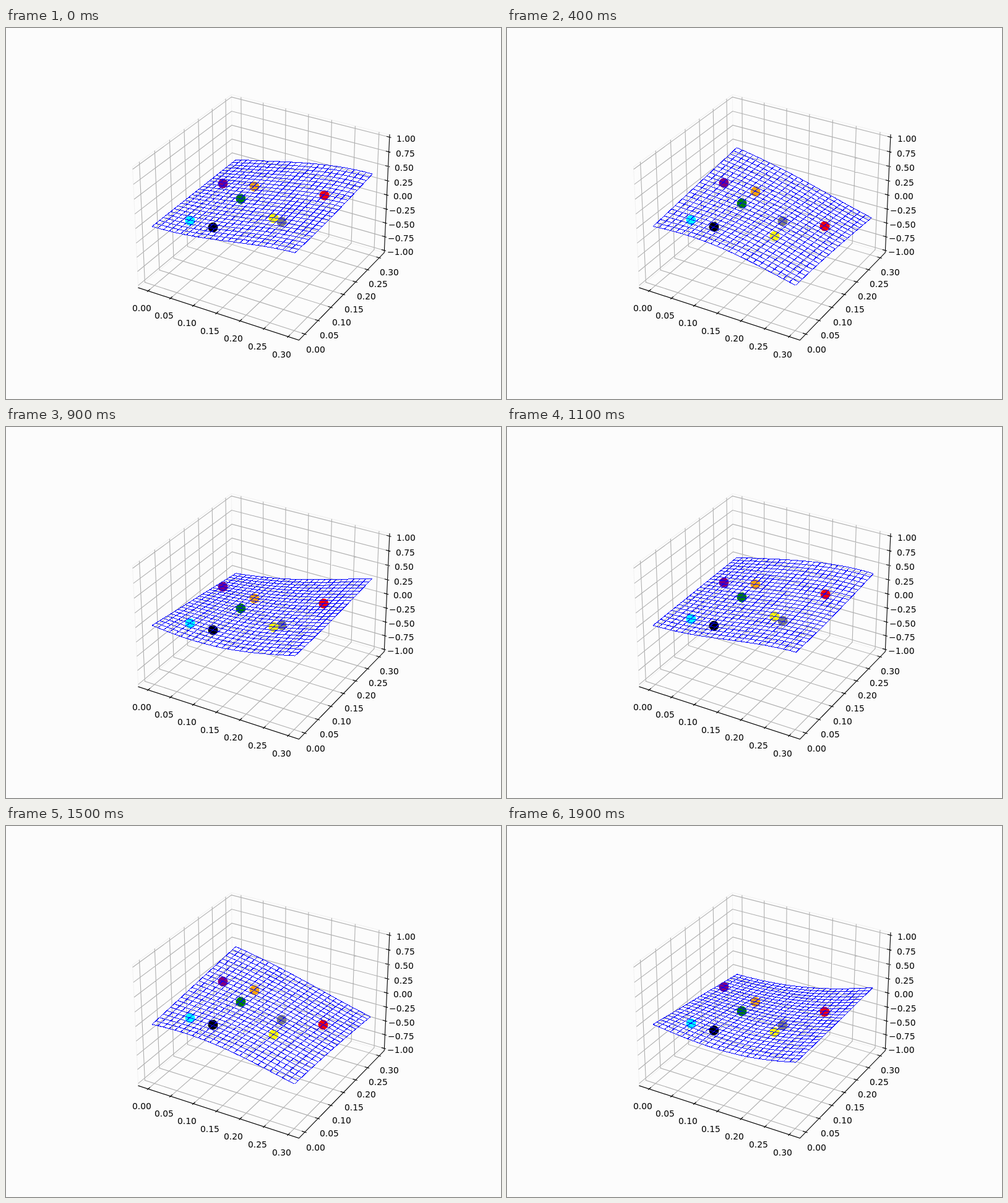
These frames come from a looping animation (800x600 px, 2 s). An HTML page:

```html
<!DOCTYPE html>
<html lang="en">
<head>
<meta charset="utf-8">
<title>Waving sheet</title>
<style>
  html, body { margin: 0; width: 100%; height: 100%; overflow: hidden; background: #fcfcfc; }
  svg { display: block; width: 800px; height: 600px; }
  path { fill: none; }
  text { font: 13.89px "DejaVu Sans", sans-serif; fill: #000; }
</style>
</head>
<body>
<svg id="stage" viewBox="0 0 800 600"></svg>
<script>
const svg = document.getElementById('stage');
const SIZE = 0.3, CELLS = 24;
const STEPS = 20, STEP_MS = 100;
const PHASE_STEP = 3.5 * Math.PI / (STEPS - 1);

// Half sizes of the plot box: the data limits, and the slightly larger panes.
const HX = 4 / 7, HZ = 3 / 7;
const PX = HX * 25 / 24, PZ = HZ * 25 / 24;
const DX = HX / 6, DZ = HZ / 6;

const boxX = v => ((v + SIZE * 0.05) / (SIZE * 1.1) - 0.5) * 2 * HX;
const boxZ = v => v * HZ;

// Camera at elevation 30, azimuth -60, distance 10.
const C = Math.sqrt(3) / 2;
const depth = (x, y, z) => C / 2 * x - 0.75 * y + z / 2;
function project(x, y, z) {
  const k = 2497.3 / (10 - depth(x, y, z));
  return [416.24 + k * (C * x + y / 2), 296.76 - k * (-x / 4 + C / 2 * y + C * z)];
}

const line = pts => 'M' + pts.map(p => project(...p).map(v => v.toFixed(2)).join(' ')).join('L');

function add(tag, attrs, text) {
  const el = document.createElementNS('http://www.w3.org/2000/svg', tag);
  for (const key in attrs) el.setAttribute(key, attrs[key]);
  if (text) el.textContent = text;
  return svg.appendChild(el);
}

function stroke(lines, color, cap = 'butt') {
  add('path', { d: lines.map(line).join(''), stroke: color, 'stroke-width': 1.11, 'stroke-linecap': cap });
}

// Labels hang centred below their anchor, snapped to whole pixels.
function label(value, x, y, z) {
  const [px, py] = project(x, y, z);
  const el = add('text', { y: Math.round(py + 10.9) }, value.toFixed(2).replace('-', '\u2212'));
  el.setAttribute('x', Math.round(px - el.getComputedTextLength() / 2));
}

function drawAxes() {
  const flat = Array.from({ length: 7 }, (_, i) => i * 0.05);
  const tall = Array.from({ length: 9 }, (_, i) => -1 + i * 0.25);
  const near = PX - 0.2 * DX, far = PX + 0.1 * DX;
  const offX = PX + 0.83 * DX, offZ = PZ + 0.83 * DZ;
  const grid = [], ticks = [];

  stroke([
    [[-PX, -PX, PZ], [-PX, PX, PZ], [PX, PX, PZ]],
    [[-PX, PX, PZ], [-PX, PX, -PZ], [PX, PX, -PZ]],
    [[-PX, -PX, PZ], [-PX, -PX, -PZ], [-PX, PX, -PZ]]
  ], '#f2f2f2');

  for (const v of flat) {
    const p = boxX(v);
    grid.push([[p, -PX, -PZ], [p, PX, -PZ], [p, PX, PZ]]);
    grid.push([[-PX, p, PZ], [-PX, p, -PZ], [PX, p, -PZ]]);
    ticks.push([[p, -near, -PZ], [p, -far, -PZ]]);
    ticks.push([[near, p, -PZ], [far, p, -PZ]]);
    label(v, p, -offX, -offZ);
    label(v, offX, p, -offZ);
  }
  for (const v of tall) {
    const p = boxZ(v);
    grid.push([[-PX, -PX, p], [-PX, PX, p], [PX, PX, p]]);
    ticks.push([[near, PX, p], [far, PX, p]]);
    label(v, offX, offX, p);
  }
  stroke(grid, '#b0b0b0');
  stroke([[[-PX, -PX, -PZ], [PX, -PX, -PZ], [PX, PX, -PZ], [PX, PX, PZ]], ...ticks], '#000', 'square');
}

const height = (x, y, phase) => Math.hypot(x, y) * Math.sin(2 * Math.PI * x + phase);

// Some dots ride at the height of another place: [color, x, y, height at x, height at y].
const dots = [
  ['cyan', 0.05, 0.05],
  ['green', 0.1, 0.15],
  ['orange', 0.1, 0.2],
  ['yellow', 0.2, 0.1],
  ['red', 0.25, 0.2],
  ['black', 0.1, 0.05, 0.05, 0.05],
  ['purple', 0.03, 0.2, 0.05, 0.05],
  ['gray', 0.2, 0.13, 0.05, 0.05]
].map(([color, x, y, hx = x, hy = y]) => ({ color, x, y, hx, hy }));

drawAxes();
dots.sort((a, b) => depth(boxX(a.x), boxX(a.y), 0) - depth(boxX(b.x), boxX(b.y), 0));
for (const dot of dots) dot.el = add('circle', { r: 7.95, fill: dot.color });
const mesh = add('path', { stroke: '#00f', 'stroke-width': 1, 'shape-rendering': 'crispEdges' });
const marks = Array.from({ length: CELLS + 1 }, (_, i) => i * SIZE / CELLS);

function update(phase) {
  const at = (x, y) => [boxX(x), boxX(y), boxZ(height(x, y, phase))];
  mesh.setAttribute('d', marks.map(a =>
    line(marks.map(b => at(a, b))) + line(marks.map(b => at(b, a)))).join(''));
  for (const { el, x, y, hx, hy } of dots) {
    const [px, py] = project(boxX(x), boxX(y), boxZ(height(hx, hy, phase)));
    el.setAttribute('cx', Math.round(px) + 0.5);
    el.setAttribute('cy', Math.round(py) + 0.5);
  }
}

let shown = -1;
function tick() {
  const step = Math.floor(performance.now() / STEP_MS) % STEPS;
  if (step !== shown) update((shown = step) * PHASE_STEP);
  requestAnimationFrame(tick);
}
tick();
</script>
</body>
</html>
```
